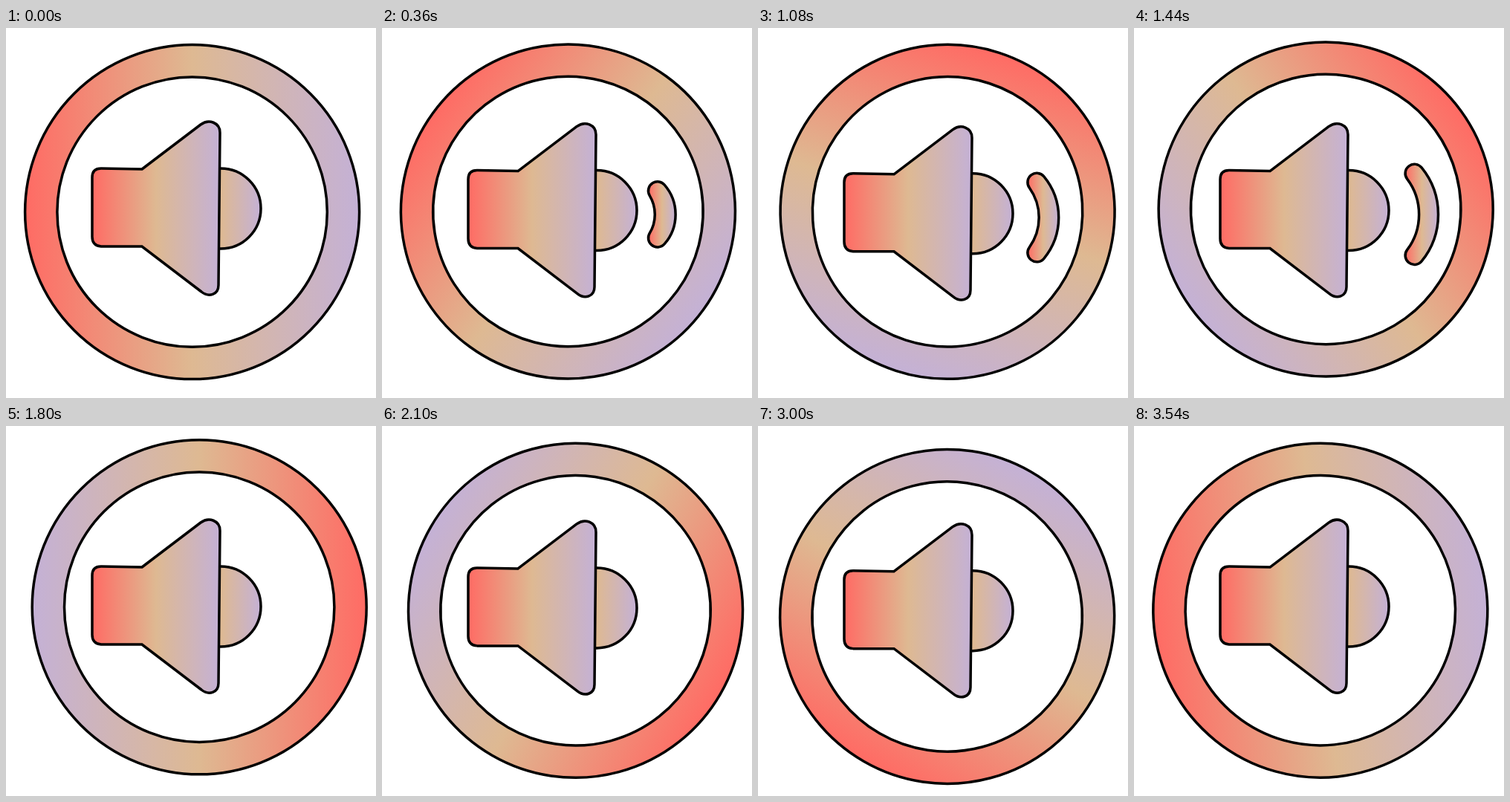
Animation of 498x498 px, one loop 3.6 s. Source, as an HTML page with a canvas:

```html
<!DOCTYPE html>
<html lang="en">
<head>
<meta charset="utf-8">
<title>Speaker</title>
<style>
html, body { margin: 0; width: 100%; height: 100%; overflow: hidden; background: #fff; }
canvas { display: block; }
</style>
</head>
<body>
<canvas id="stage" width="498" height="498"></canvas>
<script>
const ctx = document.getElementById('stage').getContext('2d');
const LOOP = 3600, STEP = 60, TAU = Math.PI * 2;
const cone = new Path2D('M183 190 L262 130 C273 122 288 127 288 141 L286 346 ' +
  'C286 359 273 363 263 355 L183 294 L128 294 Q116 293 116 281 L116 201 Q116 189 128 189 Z');
const bump = new Path2D();
bump.arc(289, 243, 54, 0, TAU);
const ring = new Path2D();
ring.arc(0, 0, 225, 0, TAU);
ring.closePath();
ring.moveTo(181.7, 0);
ring.arc(0, 0, 181.7, 0, TAU);

function gradient(left, right) {
  const g = ctx.createLinearGradient(left, 0, right, 0);
  g.addColorStop(0, '#ff6b64');
  g.addColorStop(0.5, '#deb992');
  g.addColorStop(1, '#c4b1d6');
  return g;
}

function shape(path, left, right) {
  ctx.fillStyle = gradient(left, right);
  ctx.fill(path, 'evenodd');
  ctx.strokeStyle = '#000';
  ctx.lineWidth = 3.5;
  ctx.stroke(path);
}

// The ring turns around a point slightly off its centre.
function drawRing(turn) {
  ctx.save();
  ctx.translate(255.4, 245.7);
  ctx.rotate(turn);
  ctx.translate(-4.8, 1.9);
  shape(ring, -225, 225);
  ctx.restore();
}

// Radius and half angle of an arc with the given half chord and sagitta.
function arcOf(half, sag) {
  const radius = (half * half + sag * sag) / (2 * sag);
  return { radius, angle: Math.asin(half / radius) };
}

// The sound wave, a crescent with round tips, opens up while it is visible.
function drawWave(t) {
  if (t < 360 || t >= 1800) return;
  const k = (t - 660) / 780, cap = 12.4, y = 248.3;
  const half = 38.2 + 17 * k, tip = 372.7 + 4.8 * k;
  const outerSag = 14 + 5.6 * k, innerSag = 11.5 + 7 * k;
  const outer = arcOf(half, outerSag), inner = arcOf(half, innerSag);
  const wave = new Path2D();
  wave.arc(tip + outerSag - outer.radius, y, outer.radius + cap, -outer.angle, outer.angle);
  wave.arc(tip, y + half, cap, outer.angle, inner.angle + Math.PI);
  wave.arc(tip + innerSag - inner.radius, y, inner.radius - cap, inner.angle, -inner.angle, true);
  wave.arc(tip, y - half, cap, Math.PI - inner.angle, TAU - outer.angle);
  wave.closePath();
  shape(wave, tip - cap, tip + outerSag + cap);
}

function draw(now) {
  const t = Math.floor(now % LOOP / STEP) * STEP;
  const turn = t / LOOP * TAU;
  ctx.clearRect(0, 0, 498, 498);
  ctx.save();
  ctx.translate(0, 3.75 * (1 - Math.cos(2 * turn)));
  drawRing(turn);
  shape(bump, 235, 343);
  shape(cone, 116, 288);
  drawWave(t);
  ctx.restore();
}

let start;
function tick(now) {
  start ??= now;
  draw(now - start);
  requestAnimationFrame(tick);
}
draw(0);
requestAnimationFrame(tick);
</script>
</body>
</html>
```
